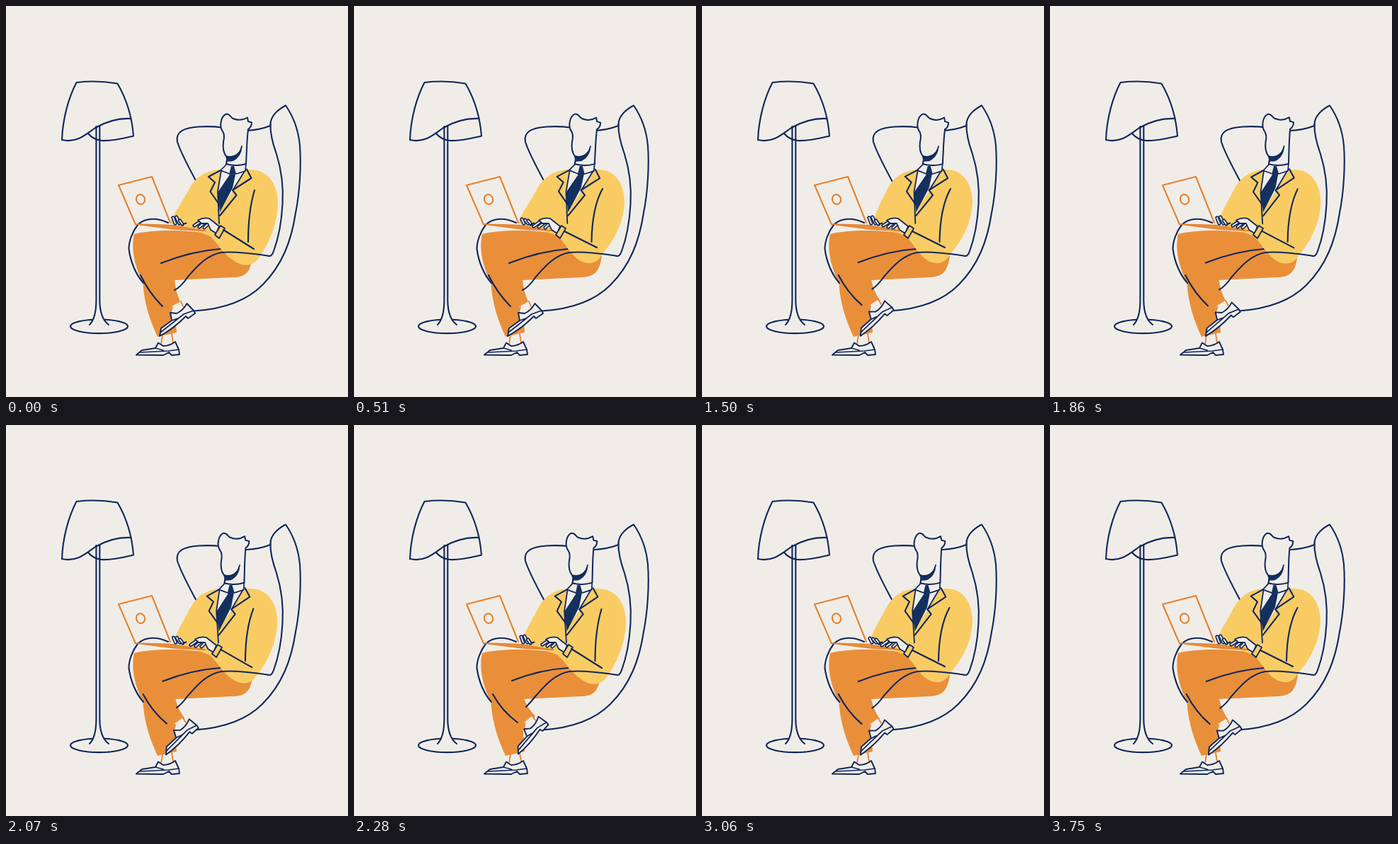
Recreate the animation shown at these times as an HTML page with a canvas. Size 483x552 px, loop 3.78 s.

```html
<!DOCTYPE html>
<html lang="en">
<head>
<meta charset="utf-8">
<title>Working in an armchair</title>
<style>
html, body { margin: 0; width: 100%; height: 100%; overflow: hidden; background: #f0ede8; }
canvas { display: block; width: 483px; height: 552px; }
</style>
</head>
<body>
<canvas id="stage" width="483" height="552"></canvas>
<script>
const ctx = document.getElementById('stage').getContext('2d');
const LOOP = 3780;
const PAPER = '#f0ede8', NAVY = '#10265a', INK = '#14305f', ORANGE = '#e98f3a', RUST = '#e6822f', YELLOW = '#f9cc63';

// Each track is a list of [time, value]; values ease between neighbours.
const tracks = {
  arm: [[0, 1], [60, 1], [480, 0], [630, 0], [870, .3], [1050, .3], [1440, 0], [1590, 0], [1860, .2], [2280, 1], [2640, 0], [LOOP, 0]],
  foot: [[0, 0], [1050, 0], [1500, .46], [1590, .46], [1860, .2], [2280, 1], [2640, .46], [LOOP, .46]],
  lean: [[0, 0], [60, 0], [480, .3], [1560, .3], [1860, -.8], [2100, -1], [LOOP, -1]],
  side: [[0, 0], [1050, 0], [1500, 1], [1590, 1], [1860, .55], [3210, .45], [3750, .3], [LOOP, .3]],
  tap: [[0, 0], [60, 0], [510, 1], [630, 1], [870, 0], [1050, 0], [1260, 1], [1500, 0], [1860, 0], [2100, .6], [2280, 0],
        [2640, .6], [2850, 0], [3060, 1], [3150, 1], [3360, .2], [3510, .2], [3750, 0], [LOOP, 0]]
};

function sample(keys, t) {
  const i = Math.max(1, keys.findIndex(k => k[0] >= t));
  const [t0, v0] = keys[i - 1], [t1, v1] = keys[i];
  const u = (t - t0) / (t1 - t0);
  return v0 + (v1 - v0) * u * u * (3 - 2 * u);
}

function mix(a, b, u) {
  const ends = b.match(/-?[\d.]+/g);
  let i = 0;
  return a.replace(/-?[\d.]+/g, n => (+n + (ends[i++] - n) * u).toFixed(2));
}

function fill(d, color) {
  ctx.fillStyle = color;
  ctx.fill(new Path2D(d));
}

function line(d, color = NAVY, width = 2.1) {
  ctx.strokeStyle = color;
  ctx.lineWidth = width;
  ctx.stroke(new Path2D(d));
}

function shape(d, inside, edge = NAVY, width = 1.9) {
  fill(d, inside);
  line(d, edge, width);
}

function finger(d) {
  line(d, NAVY, 5.2);
  line(d, PAPER, 1.9);
}

function turned(x, y, angle, draw) {
  ctx.save();
  ctx.translate(x, y);
  ctx.rotate(angle);
  ctx.translate(-x, -y);
  draw();
  ctx.restore();
}

function lamp() {
  line('M79 189C80 160 88 130 99.5 108Q128 104.5 157.5 109.5C170 131 178 157 180 183.5C165 187 150 191 135 190C126 189 121 186 116 180');
  line('M79 189C100 194 113 181 126 172C142 163 158 158 176.5 159');
  ctx.beginPath();
  ctx.ellipse(131.5, 452.3, 40.5, 9.8, 0, 0, Math.PI * 2);
  ctx.stroke();
  fill('M127.4 415C127.4 432 124 444 118 450H145C137 444 132.3 432 132.3 415Z', PAPER);
  line('M127.4 170V415C127.4 432 124 444 118 450M132.3 170V415C132.3 432 137 444 145 450');
}

function chairBack() {
  line('M270 250C258 228 247 207 242 192C239 177 252 172 272 170.5Q290 169.5 305 171.5M340 176Q358 175 373.5 169');
  line('M373.5 167C373.5 157 382 147 395 140.5C405 155 413 175 415 197C417 225 415 262 409 292C403 332 390 366 362 394C338 418 305 428 266 430.5');
}

function chairSeat(p) {
  const front = 'M373.5 167C373 180 377 195 382 209C388 228 392 255 390.5 280C389 306 384 330 378 346C376 352 374 354 369 352.5C345 349 322 346 304 348C282 352 268 370 257 382';
  line(front + mix('Q247 397 238 401', 'Q250 391 243 398', p.foot));
  line('M229 306C214 299 197 298 186 309C178 319 173.5 333 173.5 343C176 362 184 380 194 391');
}

function legs(p) {
  fill(mix(
    'M181 322C206 316 250 315 292 322L346 364C343 378 335 383 320 383L238 387L215 425L193 390C183 370 176 345 181 322Z',
    'M181 322C206 316 250 315 292 322L350 352C347 376 339 382 322 383L238 387L215 425L193 390C183 370 176 345 181 322Z',
    1 - p.arm), ORANGE);
  fill('M193 383C194 418 203 443 214 467L241 461L238 420L225 395Z', ORANGE);
  fill(mix('M191 374L238 386Q240 405 246 417L221 442Z', 'M195 374L240 386Q245 400 256 411L232 435Z', p.foot), ORANGE);
  line(mix('M219 363Q262 346 302 343', 'M223 361Q264 345 302 343', p.foot));
  line(mix('M190 380Q202 405 221 424', 'M196 380Q209 404 231 420', p.foot));
}

function shoes(p) {
  line('M221 465L219 477M234 463L236 475', RUST, 1.8);
  shape('M184 492.5L192 486L211 483L215 475.5L222 480Q231 480 239 474L244 485L245 492L234 493L230 489L222 493Z', PAPER);
  line('M189 489L229 487L244 485M211 483L222 486', NAVY, 1.7);

  turned(217, 391, -.2 * p.foot, () => {
    fill('M234 424L247 417L251 423L241 435L232 433Z', PAPER);
    line('M235 425L232 434M247 417L250 424', RUST, 1.8);
    shape('M217 466L219 455L234 444L232 433L241 434Q250 430 255.5 420L265 430L267 434L257 441L254 438Q236 456 217 466Z', PAPER);
    line('M218 461L251 435L265 430M234 444L243 441', NAVY, 1.7);
  });
}

function jacket(p) {
  const right = mix(
    'C366 231 382 246 384 274C385 307 370 338 356 357C346 369 334 367 324 361C308 352 300 336 288 325',
    'C366 231 380 246 382 274C382 306 366 333 350 351C343 365 330 365 320 360C306 352 299 336 288 325',
    1 - p.arm);
  const left = mix(
    'L232 307C236 293 247 280 257 261C267 242 282 231 304 231Z',
    'L243 307C243 292 254 275 262 258C270 242 284 232 304 231Z', p.side);
  fill('M304 231L345 231' + right + 'L262 315' + left, YELLOW);
  ctx.save();
  ctx.translate(Math.min(0, p.lean) * 1.5, 0);
  line(mix('M351 260C345 280 342 305 342 333', 'M351 258C341 276 336 300 335.5 333', 1 - p.arm));
  ctx.restore();
}

function bust() {
  fill('M303 232L340 230L322 259L302 288L299 262Z', PAPER);
  shape('M312 216L311 224L303 232L316 237L325 237L338 233L339 222L337 200Z', PAPER, NAVY, 1.7);
  shape('M311 212C307 207 306 200 307 192C309 184 308 180 306 177C301 170 303 156 311 152.5C317 152 317 158 321 159C328 162 335 161 341 157.5L342 163L347 164.5C347 169 345 172 342 174C340 190 340 205 339 223Q324 227 311 223L312.5 217Z', PAPER, NAVY, 2);
  fill('M311 211.5C322 215 330 208 333 197.5C334 209 326 217 320 219Q315 220 312 219Z', INK);
  line('M333 198C331 209 322 215 311 212', NAVY, 1.8);
  fill('M318 226L322 226L325 237L315 238ZM316 238L324 238L320 257L302 291L299 263Z', INK);
  line('M303 232L286 241L295 249L288.5 262L301 280M340 230.5L346.5 243L320 260L325.5 267L302 296');
  line('M304 232L299 262L301 307M337 233L321 259', NAVY, 1.8);
}

function laptop() {
  line('M183 308.5L159 253L206 241L232 306', RUST, 2.1);
  turned(190, 273, -.35, () => {
    ctx.beginPath();
    ctx.ellipse(190, 273, 6, 7, 0, 0, Math.PI * 2);
    ctx.stroke();
  });
  shape('M183 308L234 309.5L282 317.5L238 315Z', ORANGE, RUST, 1.4);
}

function hands(p) {
  finger(mix('M236 299L239 307', 'M237 301L240 307', p.tap));
  finger(mix('M240.5 298L245 307', 'M241.5 302L246 307', p.tap));
  finger(mix('M245.5 303L249 308', 'M246 303L250 308', p.tap));
  line('M250 308L254.5 306.5', NAVY, 1.9);

  ctx.save();
  ctx.translate(-10 * (1 - p.arm), 0);
  finger(mix('M277 303L266 310', 'M275 303L264 311', p.tap));
  finger(mix('M280 306L273 312', 'M280 305L271 312', p.tap));
  finger('M285 308L280 313');
  shape('M271 302.5Q279 298 287 300L301 311L297 321L289 316L285 307L276 307Z', PAPER, NAVY, 1.8);
  shape('M303 310L309 314L301 328L295 323Z', YELLOW, NAVY, 1.8);
  ctx.restore();
  line(mix('M307 316L350 343', 'M297 318L343 341', 1 - p.arm));
}

function draw(t) {
  const p = {};
  for (const name in tracks) p[name] = sample(tracks[name], t);
  ctx.fillStyle = PAPER;
  ctx.fillRect(0, 0, 483, 552);
  ctx.lineJoin = ctx.lineCap = 'round';
  lamp();
  chairBack();
  legs(p);
  jacket(p);
  chairSeat(p);
  turned(320, 360, .019 * p.lean, bust);
  laptop();
  hands(p);
  shoes(p);
}

const start = performance.now();
function tick() {
  draw((performance.now() - start) % LOOP);
  requestAnimationFrame(tick);
}
tick();
</script>
</body>
</html>
```
